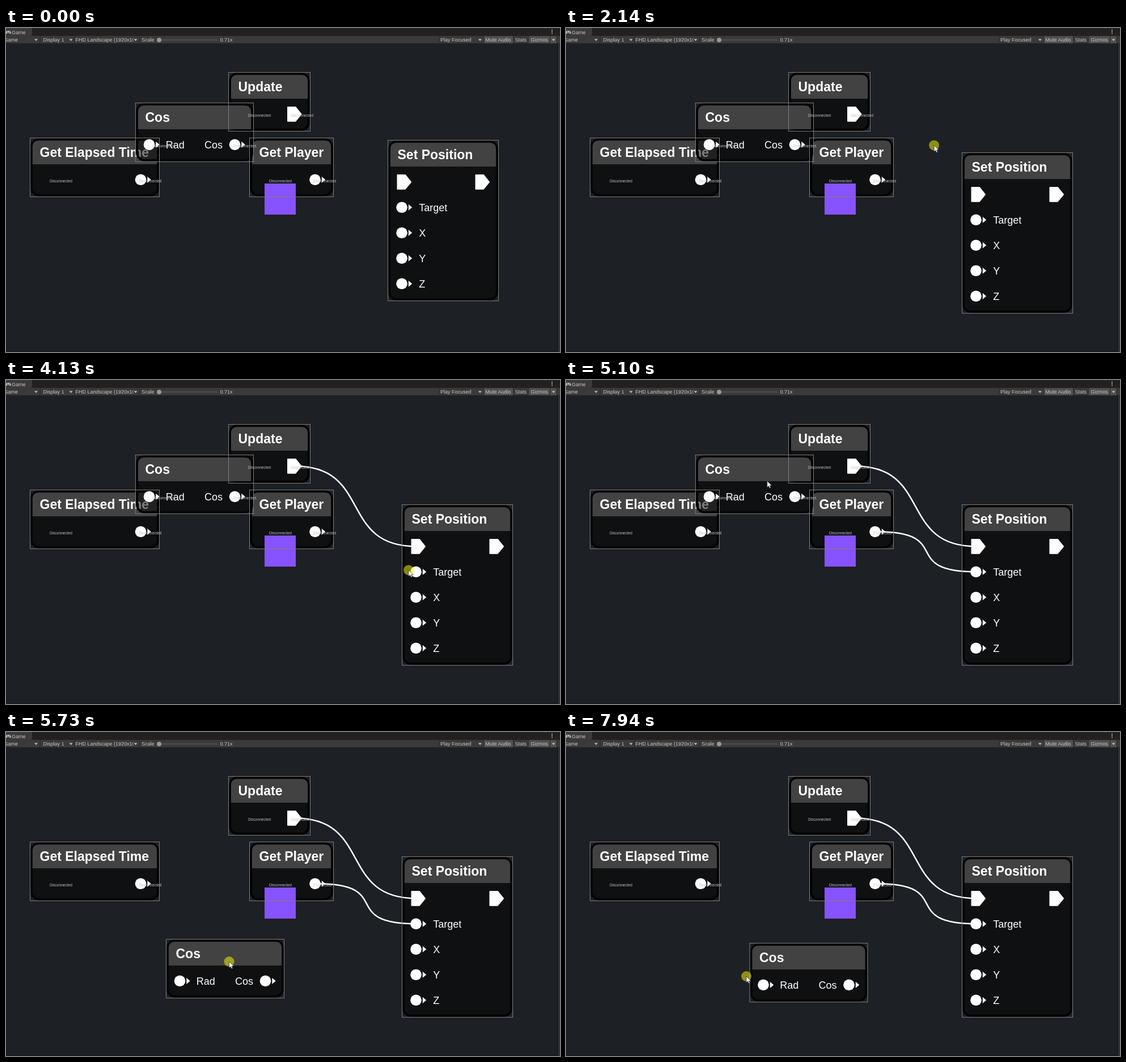
An HTML page for the animation above (8 s loop, 977 px wide and 573 px high).

```html
<!DOCTYPE html>
<html lang="en">
<head>
<meta charset="utf-8">
<title>Node graph</title>
<style>
  html, body { margin: 0; width: 100%; height: 100%; overflow: hidden; background: #1d2024; }
  svg { display: block; width: 977px; height: 573px; font-family: "Liberation Sans", Arial, sans-serif; }
  .title { font-weight: bold; font-size: 23px; fill: #fff; }
  .port { font-size: 18px; fill: #fff; }
  .state { font-size: 6.6px; fill: #c4c4c4; }
  .bar { font-size: 9px; fill: #c8c8c8; }
  .frame { fill: none; stroke: #7c7e80; }
  .wire { fill: none; stroke: #fff; stroke-width: 2.5; }
</style>
</head>
<body>
<svg viewBox="0 0 977 573">
  <g id="nodes"></g>
  <g id="wires"></g>
  <rect x="456" y="275" width="55" height="55" fill="#8752ff"/>
  <g id="gizmos"></g>
  <g id="toolbar"></g>
  <g id="cursor">
    <circle id="press" r="9" fill="#ff0" opacity=".5"/>
    <path d="M0 0V11.2L2.6 8.9 4.4 12.8 6.3 12 4.6 8.2H8.2Z" fill="#fff" stroke="#222" stroke-width=".7"/>
  </g>
</svg>
<script>
const NS = 'http://www.w3.org/2000/svg';
const $ = id => document.getElementById(id);

function add(parent, tag, attrs, text) {
  const el = document.createElementNS(NS, tag);
  for (const key in attrs) el.setAttribute(key, attrs[key]);
  if (text) el.textContent = text;
  return parent.appendChild(el);
}
const label = (g, cls, x, y, text) => add(g, 'text', { class: cls, x, y }, text);
const rect = (g, x, y, width, height, fill) => add(g, 'rect', { x, y, width, height, fill });
const place = (el, x, y) => el.setAttribute('transform', `translate(${x} ${y})`);
const show = (el, on) => el.setAttribute('visibility', on ? 'visible' : 'hidden');

// Nodes
const ROW = 73.8;

function dataPort(node, x, y = ROW) {
  add(node.body, 'circle', { cx: x, cy: y, r: 9.8, fill: '#fff' });
  add(node.body, 'path', { d: `M${x + 11.8} ${y - 5.5}l6.4 5.5-6.4 5.5z`, fill: '#fff' });
}
function execPort(node, x) {
  add(node.body, 'path', {
    d: `M${x + 1} ${ROW - 12.4}h13.5l10 12.4-10 12.4h-13.5z`,
    fill: '#fff', stroke: '#fff', 'stroke-width': 2, 'stroke-linejoin': 'round'
  });
}
const stateLabel = (node, x) => label(node.gizmo, 'state', x, ROW + 4.8, 'Disconnected');

function makeNode(title, x, y, w, h = 104) {
  const body = add($('nodes'), 'g');
  const gizmo = add($('gizmos'), 'g');
  add(body, 'rect', {
    x: 2.6, y: 2.6, width: w - 5.2, height: h - 5.2, rx: 13,
    fill: '#000', 'fill-opacity': .5, stroke: '#040404', 'stroke-width': 4.2
  });
  add(body, 'path', { d: `M4.4 46.5V16q0-11.5 11.5-11.5H${w - 15.9}q11.5 0 11.5 11.5V46.5z`, fill: '#424242' });
  label(body, 'title', 17, 33.8, title);
  add(gizmo, 'rect', { class: 'frame', width: w, height: h });
  const move = (nx, ny) => [body, gizmo].forEach(el => place(el, nx, ny));
  move(x, y);
  return { body, gizmo, move };
}

function makeSource(title, x, y, w) {
  const node = makeNode(title, x, y, w);
  stateLabel(node, 34.5);
  return node;
}

const elapsed = makeSource('Get Elapsed Time', 42.5, 194.5, 228);
dataPort(elapsed, 195);
stateLabel(elapsed, 192);

const player = makeSource('Get Player', 429.5, 194.5, 148);
dataPort(player, 115.5);
const playerState = stateLabel(player, 112.5);

const update = makeSource('Update', 392.5, 78.5, 144);
execPort(update, 103.5);
const updateState = stateLabel(update, 109.5);

const cos = makeNode('Cos', 228.5, 132.5, 208);
dataPort(cos, 24);
dataPort(cos, 175);
label(cos.body, 'port', 53.3, ROW + 6.4, 'Rad');
label(cos.body, 'port', 121.5, ROW + 6.4, 'Cos');
const cosStates = [stateLabel(cos, 30), stateLabel(cos, 172.5)];

const setPosition = makeNode('Set Position', 673.5, 198.5, 195, 284);
execPort(setPosition, 16);
execPort(setPosition, 154);
['Target', 'X', 'Y', 'Z'].forEach((name, i) => {
  const y = ROW + 45 * (i + 1);
  dataPort(setPosition, 24.5, y);
  label(setPosition.body, 'port', 54.7, y + 6.4, name);
});

function makeWire(x1, y1, x2, y2) {
  const reach = 138;
  const d = `M${x1} ${y1}C${x1 + reach} ${y1} ${x2 - reach} ${y2} ${x2} ${y2}`;
  return add($('wires'), 'path', { class: 'wire', d });
}
const execWire = makeWire(508.5, 152.3, 724, 294.3);
const targetWire = makeWire(548, 268.3, 724, 339.3);

// Toolbar
function drawToolbar(g) {
  const dropArrow = x => add(g, 'path', { d: `M${x - 3} 19.5h6l-3 3.5z`, fill: '#c4c4c4' });
  const button = (x, w) => rect(g, x, 14.5, w, 12.5, '#505050');
  const text = (x, string) => label(g, 'bar', x, 24.3, string);

  rect(g, 0, 0, 977, 14, '#212121');
  rect(g, 0, 0, 46, 14, '#3a3a3a');
  rect(g, 0, 0, 46, 1, '#33405c');
  rect(g, 0, 14, 977, 14, '#3a3a3a');
  rect(g, 0, 27, 977, 1, '#222');
  rect(g, 972, 28, 1.5, 545, '#141414');
  rect(g, 973.5, 28, 3.5, 545, '#303030');
  rect(g, 0, 571.5, 972, 1.5, '#17191c');
  button(843, 51);
  button(922, 49);
  [59.5, 120, 235, 763, 842, 894.5, 921, 959, 971].forEach(x => rect(g, x, 14, 1, 13, '#282828'));

  add(g, 'path', { d: 'M1 5h6q2 1 1.5 5-2 1-3-1.5h-3q-1 2.5-3 1.5 0-4 1.5-5z', fill: '#c4c4c4' });
  [2.5, 6].forEach(cx => add(g, 'circle', { cx, cy: 7, r: .9, fill: '#3a3a3a' }));
  label(g, 'bar', 10, 11, 'Game');
  text(-3.5, 'Game');
  text(65.5, 'Display 1');
  text(122.5, 'FHD Landscape (1920x10');
  text(239, 'Scale');
  text(377.5, '0.71x');
  text(766, 'Play Focused');
  text(845.5, 'Mute Audio');
  text(897.5, 'Stats');
  text(925.5, 'Gizmos');
  rect(g, 224.5, 15, 10.5, 12, '#3a3a3a');
  [53, 114.5, 228.5, 836, 965.5].forEach(dropArrow);
  rect(g, 270, 20.7, 104, 1, '#606060');
  add(g, 'circle', { cx: 270, cy: 21.2, r: 4, fill: '#999' });
  [3.5, 6.5, 9.5].forEach(cy => add(g, 'circle', { cx: 963, cy, r: .9, fill: '#c4c4c4' }));
}
drawToolbar($('toolbar'));

const LOOP = 8000, LEAD = 260, TICK = 69.2;
const start = { x: 747, y: 224 };
const moves = [];
const move = (from, to, x, y, bend = 0) => moves.push({ from, to, x, y, bend });

// Drag Set Position out and back.
move(0, 6, 848, 286);
move(6, 12, 788, 236);
move(12, 14, 772, 246);
// Connect Update to Set Position.
move(15, 23, 509, 157);
move(24, 32.5, 717, 294, -.144);
// Connect Get Player to Target.
move(40, 47, 551, 268);
move(50, 58, 722, 337, .086);
// Drag Cos clear of the other nodes.
move(62, 72, 339.5, 172);
move(73.1, 79, 393.5, 406, .1);
move(79, 83, 435, 413);
// Rest on its output, then start a wire from Get Elapsed Time.
move(84, 86.3, 500, 453);
move(86.5, 90, 505, 449);
move(94, 105, 243, 264);
move(107, 111, 318, 432);

const presses = [[1, 15], [25, 37], [52, 60], [73, 84], [108, 112]];

function cursorAt(tick) {
  let { x, y } = start;
  for (const m of moves) {
    if (tick <= m.from) break;
    const u = Math.min(1, (tick - m.from) / (m.to - m.from));
    const s = 1 - (1 - u) ** 2;
    const bow = m.bend * 4 * s * (1 - s);
    const dx = m.x - x, dy = m.y - y;
    x += dx * s - dy * bow;
    y += dy * s + dx * bow;
  }
  return [x, y];
}

function drag(node, tick, grabX, grabY, from, to) {
  const [x, y] = cursorAt(Math.max(from, Math.min(tick, to)));
  node.move(x - grabX, y - grabY);
  return y - grabY;
}

function connect(wire, state, on) {
  show(wire, on);
  state.textContent = on ? 'Connected' : 'Disconnected';
}

function render(now) {
  const tick = Math.floor((now % LOOP - LEAD) / TICK + .2);
  place($('cursor'), ...cursorAt(tick));
  $('cursor').style.display = tick < 0 ? 'none' : '';
  show($('press'), presses.some(([from, to]) => tick >= from && tick < to));

  drag(setPosition, tick, 73.5, 25.5, 0, 14);
  const cosY = drag(cos, tick, 111, 39.5, 73, 83);
  cosStates.forEach(el => show(el, cosY < 320));

  connect(execWire, updateState, tick >= 36);
  connect(targetWire, playerState, tick >= 60);
  requestAnimationFrame(render);
}
requestAnimationFrame(render);
</script>
</body>
</html>
```
